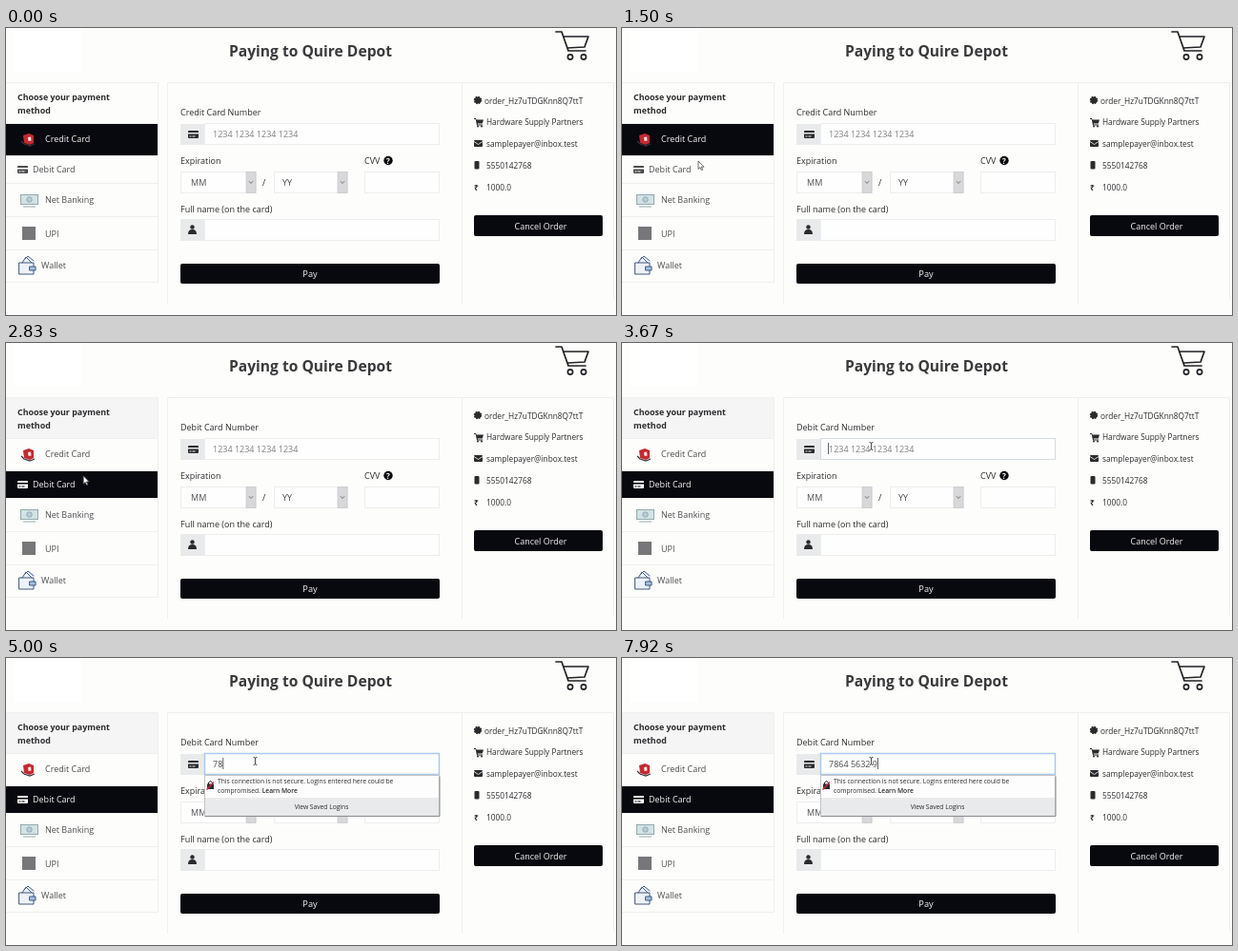
Recreate the animation shown at these times as an HTML page. Size 640x302 px, loop 8 s.

```html
<!DOCTYPE html>
<html lang="en">
<head>
<meta charset="utf-8">
<title>Payment form</title>
<style>
html, body { margin: 0; width: 100%; height: 100%; overflow: hidden; background: #fdfdfb; }
svg { display: block; width: 640px; height: 302px; font: 9px "Open Sans", "Noto Sans", sans-serif; fill: #2b2b2e; }
text { white-space: pre; }
.line { fill: none; stroke: #efeff0; }
.field { fill: #fefefe; stroke: #ededee; }
.addon, .tint { fill: #e9eaec; }
.dark { fill: #08080f; }
.light { fill: #f6f6f6; }
.nav { fill: #4c4c50; }
.hint { fill: #808084; }
.side { font-size: 8.3px; }
.small { font-size: 6.7px; }
.mid { text-anchor: middle; }
.bold { font-weight: 700; }
.ink { fill: none; stroke: #222226; stroke-linecap: round; stroke-linejoin: round; }

#creditRow { fill: #08080f; }
#debitRow, #header { fill: none; }
#credit { fill: #f6f6f6; }
.hover #debitRow { fill: #eaedea; }
.hover #debit { fill: #222226; }
.debit #creditRow { fill: none; }
.debit #debitRow { fill: #08080f; }
.debit #credit { fill: #4c4c50; }
.debit #debit { fill: #f6f6f6; }
.debit #header { fill: #f5f5f6; }
.focus #number { stroke: #d4dae2; }
.warn #number { stroke: #a9caf0; stroke-width: 1.5; }
#popup, #caret { visibility: hidden; }
.warn #popup { visibility: visible; }
</style>
</head>
<body>
<svg id="stage" viewBox="0 0 640 302">
  <defs>
    <path id="card" fill-rule="evenodd" d="M1 0h9q1 0 1 1v6q0 1-1 1H1Q0 8 0 7V1Q0 0 1 0zM0 2v1.6h11V2zM1.5 5.5v1h2v-1zm3 0v1h3v-1z"/>
    <g id="drop">
      <rect width="10" height="22" fill="#d8d8da" stroke="#c2c2c5" stroke-width=".6"/>
      <path class="ink" d="M3.2 10l1.8 2 1.8-2" style="stroke:#77777c"/>
    </g>
  </defs>
  <rect width="640" height="302" fill="#fdfdfb"/>
  <rect x="8" width="72" height="46" fill="#fff"/>
  <text x="234" y="30" class="bold" font-size="15.600" fill="#3a3a3d">Paying to Quire Depot</text>
  <g class="ink" stroke-width="1.700">
    <path d="M577 4h6l7 20h18M585 9h26l-4 11-18 1"/>
    <circle cx="592" cy="30.500" r="2.600"/><circle cx="606" cy="30.500" r="2.600"/>
  </g>

  <!-- Payment methods -->
  <rect id="header" x="0" y="58" width="159" height="43"/>
  <rect id="creditRow" x="0" y="101" width="159" height="33"/>
  <rect id="debitRow" x="0" y="134" width="159" height="29"/>
  <path class="line" d="M0 57.500h159.500v210H0M0 100.500h159M0 134.500h159M0 163.500h159M0 198.500h159M0 233.500h159"/>
  <text class="bold" font-size="8.900"><tspan x="12" y="76">Choose your payment</tspan><tspan x="12" y="90">method</tspan></text>
  <g class="nav">
    <text id="credit" x="41" y="120">Credit Card</text>
    <g id="debit"><use href="#card" x="12" y="145"/><text x="28" y="152">Debit Card</text></g>
    <text x="41" y="184">Net Banking</text>
    <text x="41" y="219.500">UPI</text>
    <text x="37" y="252.500">Wallet</text>
  </g>
  <path d="M18 113l6-2 5 2v8l-4 2-6-2z" fill="#c22a30"/>
  <path d="M16 119l3 3 6 2 5-2" fill="none" stroke="#33333f" stroke-width="1.300"/>
  <path d="M23 115l3-.5.500 4-3 .5z" fill="#f3e4e4"/>
  <g fill="#d3e2e4" stroke="#92a9b0">
    <rect x="15.500" y="175.500" width="18" height="10"/>
    <circle cx="24.500" cy="180.500" r="2.700" fill="#b4ced6"/>
    <path d="M18 188h13" fill="none"/>
  </g>
  <rect x="17" y="209" width="14" height="14" fill="#77777a"/>
  <g class="ink" style="stroke:#40587a">
    <path d="M14 247h15v12H14zM17 247l4-6 6 6M20 243l3-3 6 5" fill="#edf2f8"/>
    <rect x="25" y="251" width="6" height="4" fill="#a4c2e0"/>
  </g>

  <!-- Card form -->
  <path class="line" d="M169.500 290V57.500H478.500V290"/>
  <text id="label" x="183" y="92"></text>
  <text x="183" y="142.500">Expiration</text>
  <text x="376" y="142.500">CVV</text>
  <circle cx="401" cy="139.500" r="4.700" class="dark"/>
  <text x="401" y="142.500" class="mid bold light" style="font-size:8px">?</text>
  <text x="183" y="193.700">Full name (on the card)</text>
  <rect class="field" x="208.500" y="201.500" width="246" height="22"/>
  <rect class="addon" x="183" y="101" width="25" height="22"/>
  <rect class="addon" x="183" y="201" width="25" height="23"/>
  <use href="#card" x="191" y="108"/>
  <circle cx="195.500" cy="209.500" r="2.200"/>
  <path d="M191 217q0-5 4.500-5t4.500 5z"/>
  <rect class="field" x="183.500" y="151.500" width="79" height="22"/>
  <rect class="field" x="281.500" y="151.500" width="77" height="22"/>
  <rect class="field" x="376.500" y="151.500" width="78" height="22"/>
  <use href="#drop" x="252" y="151.500"/><use href="#drop" x="348" y="151.500"/>
  <text x="194" y="166" class="nav">MM</text>
  <text x="269" y="166">/</text>
  <text x="290" y="166" class="nav">YY</text>
  <rect class="dark" x="183" y="248" width="272" height="21" rx="2"/>
  <text x="319" y="262" class="mid light" font-size="9.200">Pay</text>
  <rect id="number" class="field" x="208.500" y="100.500" width="246" height="22"/>
  <text id="value" x="217" y="115"></text>
  <rect id="caret" y="105" width="1" height="12" fill="#66666a"/>

  <g id="popup">
    <rect x="208.500" y="123.500" width="246" height="42.500" fill="#fdfdfd" stroke="#c4c4c8"/>
    <rect x="209" y="147" width="245" height="18.500" class="tint"/>
    <path class="ink" d="M209 166.500h246V125" style="stroke:#8c8c90"/>
    <path class="ink" d="M212.500 133v-2q2-3 4 0v2"/>
    <rect x="211" y="132.500" width="7" height="5.500"/>
    <path d="M210.500 138.500l7.500-8" stroke="#d0303a" stroke-width="1.300"/>
    <text class="small"><tspan x="222" y="132">This connection is not secure. Logins entered here could be</tspan><tspan x="222" y="141.500">compromised. </tspan><tspan font-weight="600">Learn More</tspan></text>
    <text x="331" y="159" class="small mid">View Saved Logins</text>
  </g>

  <!-- Order summary -->
  <path class="line" d="M478 57.500h159.500V287"/>
  <circle cx="495" cy="76" r="3.500" stroke="#2b2b2e" stroke-width="1.500" stroke-dasharray="1.600 1.150"/>
  <path d="M491 95h2l.5 1.500h7.500l-1.200 4h-5l.2 1h5v1h-6l-1.300-6.500H491z"/>
  <circle cx="495" cy="103.500" r="1"/><circle cx="499" cy="103.500" r="1"/>
  <rect x="491" y="118" width="9" height="7" rx="1"/>
  <path d="M491 119.500l4.500 3 4.500-3" fill="none" stroke="#fdfdfb" stroke-width=".8"/>
  <rect x="491.500" y="140" width="5" height="8.500" rx="1"/>
  <g class="side">
    <text x="491" y="170.500" class="bold">₹</text>
    <text x="502" y="79.500">order_Hz7uTDGKnn8Q7ttT</text>
    <text x="504" y="102">Hardware Supply Partners</text>
    <text x="504" y="125">samplepayer@inbox.test</text>
    <text x="504" y="147.500">5550142768</text>
    <text x="504" y="170.500">1000.0</text>
  </g>
  <rect class="dark" x="491" y="197" width="135" height="22" rx="2"/>
  <text x="561" y="212" class="mid light">Cancel Order</text>

  <path id="arrow" d="M0 0v8.500l2-1.800 1.400 3 1.300-.6-1.400-2.900h2.700z" fill="#fdfdfb" stroke="#4a4a4e" stroke-width=".8"/>
  <path id="beam" class="ink" stroke-width=".8" d="M-1.500-4q1.500 0 1.500 1 0-1 1.500-1M0-3v6M-1.500 4q1.500 0 1.500-1 0 1 1.500 1"/>
</svg>
<script>
const $ = id => document.getElementById(id);
const stage = $("stage"), value = $("value"), caret = $("caret");
const LOOP = 8000, SWITCH = 2700, FOCUS = 3600, WARN = 3850;
const TYPE = 4200, KEY = 455, DIGITS = "786456329";

// Pointer waypoints: time, x, y
const path = [[1000, 84, 306], [1450, 80, 140], [2800, 80, 140], [3450, 261.5, 108.5]];

function pointer(t) {
  const i = path.findIndex(p => p[0] > t);
  if (i < 0) return path[path.length - 1].slice(1);
  if (i === 0) return path[0].slice(1);
  const [t0, x0, y0] = path[i - 1], [t1, x1, y1] = path[i];
  const u = (t - t0) / (t1 - t0), e = u * u * (3 - 2 * u);
  return [x0 + (x1 - x0) * e, y0 + (y1 - y0) * e];
}

function place(el, x, y, shown) {
  el.setAttribute("transform", `translate(${x} ${y})`);
  el.style.visibility = shown ? "visible" : "hidden";
}

function draw() {
  const t = performance.now() % LOOP;
  const debit = t >= SWITCH, focus = t >= FOCUS;
  const state = { hover: t >= 1600 && !debit, debit, focus, warn: t >= WARN };
  for (const name in state) stage.classList.toggle(name, state[name]);
  $("label").textContent = (debit ? "Debit" : "Credit") + " Card Number";

  const count = t < TYPE ? 0 : Math.min(DIGITS.length, Math.floor((t - TYPE) / KEY) + 1);
  const typed = DIGITS.slice(0, count).replace(/(.{4})(?=.)/g, "$1 ");
  value.textContent = typed || "1234 1234 1234 1234";
  value.setAttribute("class", typed ? "nav" : "hint");

  const since = count ? t - TYPE - (count - 1) * KEY : t - FOCUS;
  caret.setAttribute("x", typed ? 217 + value.getComputedTextLength() : 216);
  caret.style.visibility = focus && since % 1060 < 530 ? "visible" : "hidden";

  const [x, y] = pointer(t);
  const inField = x > 208 && y < 123;
  place($("arrow"), x, y, t >= path[0][0] && !inField);
  place($("beam"), x, y, inField);
  requestAnimationFrame(draw);
}
draw();
</script>
</body>
</html>
```
